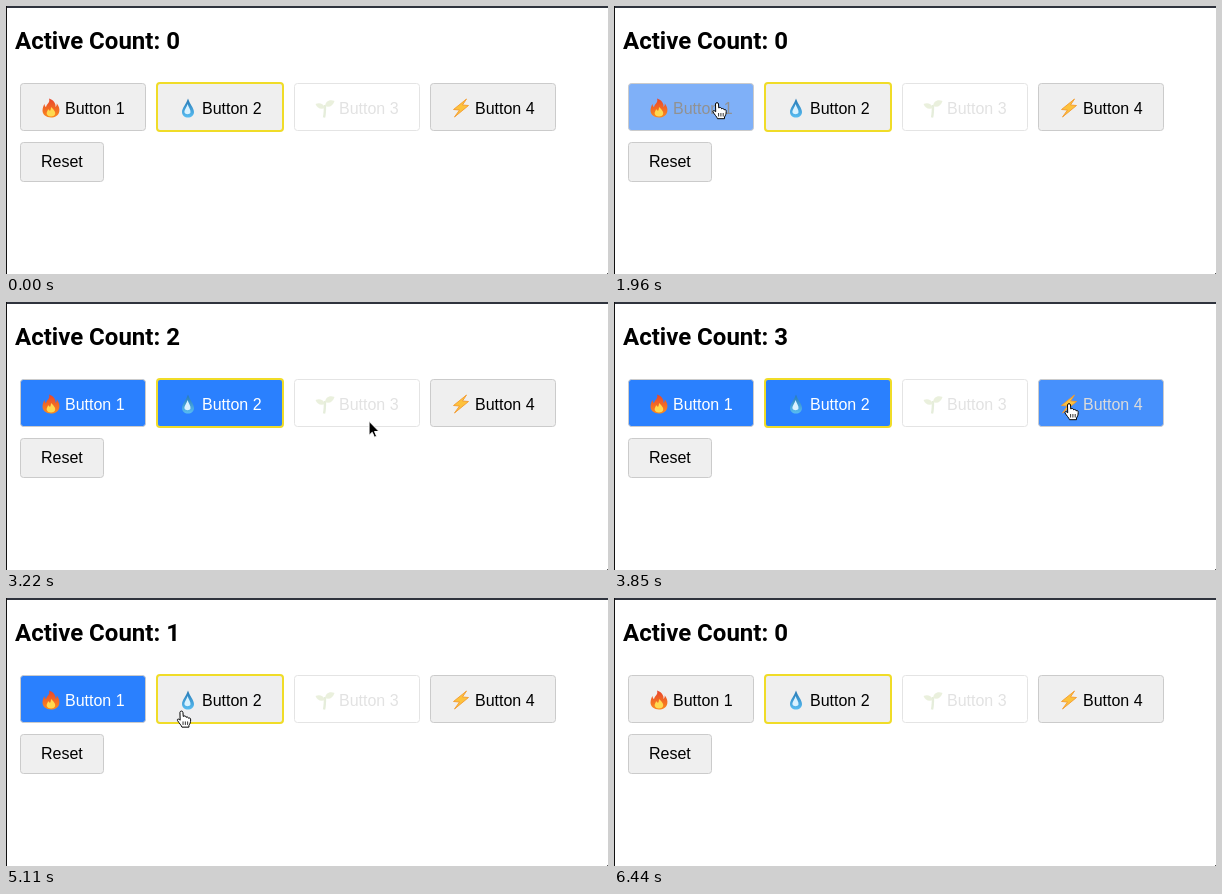
An HTML page that plays this animation: 602 by 268 pixels, repeating every 7070 ms.

```html
<!DOCTYPE html>
<html lang="en">
<head>
<meta charset="utf-8">
<title>Active count</title>
<style>
  html, body { margin: 0; width: 100%; height: 100%; overflow: hidden; background: #fff; }
  svg { display: block; width: 602px; height: 268px; }
  text { font: 16px "Liberation Sans", Arial, sans-serif; }
  #title { font: bold 24px Roboto, sans-serif; }
</style>
</head>
<body>
<svg viewBox="0 0 602 268">
  <defs>
    <linearGradient id="fire" x2="0" y2="1">
      <stop stop-color="#e8452c"/><stop offset="1" stop-color="#fb8a1e"/>
    </linearGradient>
    <linearGradient id="water" x2="0" y2="1">
      <stop stop-color="#2678b4"/><stop offset="1" stop-color="#58bdf2"/>
    </linearGradient>
    <g id="flame">
      <path fill="url(#fire)" d="M-2-9.5C3-8 5-4 4.5-1C5.5-2 6-3.5 5.7-4.8C8-2 8.8 1 8.3 3.5C7.5 7.5 4 9.5 0 9.5C-5 9.5-8.5 6.5-8.5 2.5C-8.5 0-7.5-2.5-6.5-4C-6.3-2.5-6-1.5-5-.8C-4.5-4.5-.5-5-2-9.5Z"/>
      <path fill="#ffd94f" d="M0-1C3 2 5 4 4 6.5C3 9-3 9-4 6.5C-5 4-3 3-3 1C-2 2-1.5 2.5-1 3C-.5 2 0 1 0-1Z"/>
    </g>
    <g id="drop">
      <path fill="url(#water)" d="M0-9.5C1.5-4.5 6 0 6 4C6 7.5 3.3 9.5 0 9.5C-3.3 9.5-6 7.5-6 4C-6 0-1.5-4.5 0-9.5Z"/>
      <path fill="#d9f2ff" d="M-.5-4C.5-1 3 2 2.5 4.5C2 6.5-2.5 7-3.5 4.5C-4 2-1-1-.5-4Z"/>
    </g>
    <g id="sprout" opacity=".17">
      <path fill="none" stroke="#6b9a2f" stroke-width="2.4" d="M-1 9.5C0 6 0 2 0-3"/>
      <path fill="#86a83a" d="M0-2C1-8 6-8.5 9.5-7C8-2 4 0 0-2ZM0 0C-2-5-6-5.5-9.5-4C-8 0-4 2 0 0Z"/>
    </g>
    <path id="bolt" fill="#fdc23c" stroke="#f39a2d" stroke-width=".9" stroke-linejoin="round"
      d="M5.5-9L-7.5 1.5L-1.5 2L-6.5 9L7.5-2.5L1.5-3Z"/>
  </defs>

  <rect width="602" height="268" fill="#fff"/>
  <rect width="602" height="2" fill="#2f333d"/>
  <rect width="1" height="268" fill="#111"/>
  <rect x="601" y="267" width="1" height="1" fill="#555"/>
  <text id="title" x="9" y="43"></text>
  <g id="buttons"></g>

  <g id="pointer" stroke="#000" fill="#fff" stroke-linejoin="round">
    <circle id="press" r="28.7" fill="none" stroke-width="2.8"/>
    <g id="hand">
      <path d="M-1.5 1C-1.5-.8 1.5-.8 1.5 1L1.8 5C3 4 4.5 4.5 4.6 5.8C6 5 7 6 7.1 6.8C8.5 6 9.3 7 9.2 8.5C9.2 11 8.5 12.5 7.5 14V15.7H.5C0 14-2.5 11.5-4 9C-4.5 7.5-2.8 7-1.3 8.8Z"/>
      <path d="M1.6 10V13.5M3.9 10V13.5M6.2 10V13.5" stroke-width=".8"/>
    </g>
    <path id="arrow" stroke="#fff" fill="#000" d="M0 0V14L3.2 11L5.4 16L7.6 15L5.5 10.2H10Z"/>
  </g>
</svg>

<script>
const LOOP = 7070, STEP = 70, FADE = 300;
const $ = id => document.getElementById(id);

// toggles: times at which a button switches on, off, on, ...
const buttons = [
  { x: 14, y: 77, w: 126, h: 48, label: 'Button 1', icon: 'flame', toggles: [1330, 1895, 2400, 5800] },
  { x: 150, y: 76, w: 128, h: 50, label: 'Button 2', icon: 'drop', border: '#f0dc28', line: 2, toggles: [2900, 4840] },
  { x: 288, y: 77, w: 126, h: 48, label: 'Button 3', icon: 'sprout', disabled: true, border: '#e4e4e4', toggles: [] },
  { x: 424, y: 77, w: 126, h: 48, label: 'Button 4', icon: 'bolt', toggles: [3678, 4100] },
  { x: 14, y: 136, w: 84, h: 40, label: 'Reset', toggles: [] },
];

// time, x, y of the pointer tip
const path = [
  [70, 255, 241], [560, 72, 102], [1110, 72, 102], [1260, 103, 97], [2400, 103, 97],
  [2750, 182, 98], [2920, 182, 98], [3360, 420, 126], [3570, 455, 102], [4130, 455, 102],
  [4620, 212, 100], [4900, 212, 101], [5530, 71, 149], [5800, 71, 149], [6400, 243, 220],
];
const presses = [
  [600, 710], [1260, 1330], [1820, 1895], [2310, 2400], [2800, 2900],
  [3570, 3678], [4030, 4100], [4760, 4840], [5600, 5800],
];

function addShape(parent, tag, attrs) {
  const node = document.createElementNS('http://www.w3.org/2000/svg', tag);
  for (const name in attrs) node.setAttribute(name, attrs[name]);
  return parent.appendChild(node);
}

for (const b of buttons) {
  const line = b.line || 1;
  b.box = addShape($('buttons'), 'rect', {
    x: b.x + line / 2, y: b.y + line / 2, width: b.w - line, height: b.h - line,
    rx: 3, stroke: b.border || '#cbcbcb', 'stroke-width': line,
  });
  const middle = b.y + b.h / 2;
  const inset = line - 1;
  if (b.icon) addShape($('buttons'), 'use', {
    href: '#' + b.icon, transform: `translate(${b.x + 31 + inset} ${middle + 1})`,
  });
  b.text = addShape($('buttons'), 'text', {
    x: b.x + (b.icon ? 45 + inset : 21), y: middle + (b.icon ? 7 : 5),
  });
  b.text.textContent = b.label;
}

const mix = (from, to, p) => `rgb(${from.map((v, i) => Math.round(v + (to[i] - v) * p))})`;

function buttonState(b, t) {
  const past = b.toggles.filter(time => time <= t);
  const on = past.length % 2;
  if (!past.length) return { on, level: 0 };
  const p = Math.min(1, (t - past[past.length - 1]) / FADE);
  const eased = 1 - (1 - p) ** 2.3;
  return { on, level: on ? eased : 1 - eased };
}

function pointerAt(t) {
  const next = path.findIndex(point => point[0] > t);
  if (next < 1) return path[next < 0 ? path.length - 1 : 0].slice(1);
  const [t0, x0, y0] = path[next - 1], [t1, x1, y1] = path[next];
  const p = (t - t0) / (t1 - t0), s = p * p * (3 - 2 * p);
  return [x0 + (x1 - x0) * s, y0 + (y1 - y0) * s];
}

const show = (id, visible) => $(id).setAttribute('display', visible ? 'inline' : 'none');

function draw(t) {
  let count = 0;
  for (const b of buttons) {
    const { on, level } = buttonState(b, t);
    count += on;
    b.box.setAttribute('fill', b.disabled ? '#fff' : mix([239, 239, 239], [42, 128, 254], level));
    b.text.setAttribute('fill', b.disabled ? '#e2e2e2' : mix([0, 0, 0], [255, 255, 255], level));
  }
  $('title').textContent = `Active Count: ${count}`;

  const [x, y] = pointerAt(t);
  const hovering = buttons.some(b => !b.disabled &&
    x >= b.x && x <= b.x + b.w && y >= b.y && y <= b.y + b.h);
  $('pointer').setAttribute('transform', `translate(${x} ${y})`);
  show('pointer', t >= 70 && t < 6440);
  show('hand', hovering);
  show('arrow', !hovering);
  show('press', presses.some(([down, up]) => t >= down && t < up));
}

const start = performance.now();
function tick() {
  const t = (performance.now() - start) % LOOP;
  draw(Math.floor(t / STEP) * STEP);
  requestAnimationFrame(tick);
}
tick();
</script>
</body>
</html>
```
